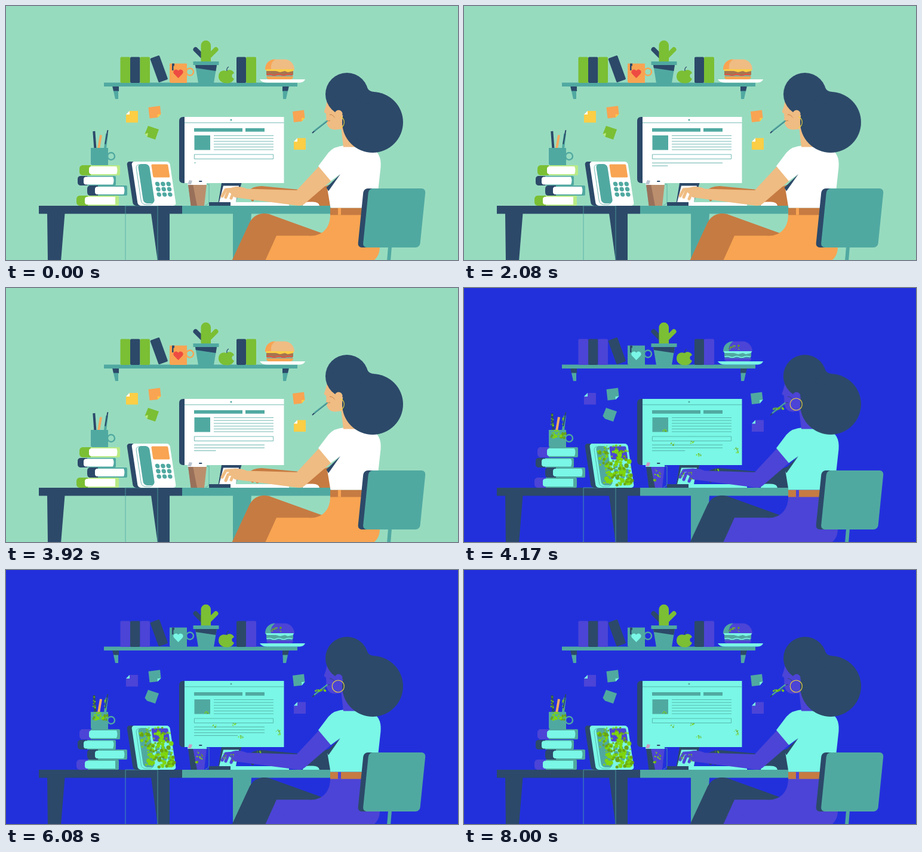
Recreate the animation shown at these times as an HTML page. Size 757 by 426 pixels, loop 8.08 s.

```html
<!DOCTYPE html>
<html lang="en">
<head>
<meta charset="utf-8">
<title>Desk by day and by blacklight</title>
<style>
html, body { margin: 0; width: 100%; height: 100%; overflow: hidden; }
svg { display: block; width: 100vw; height: 100vh; background: var(--bg); animation: theme 8.08s step-end infinite; }

@keyframes theme {
  0% {
    --bg: #97dbbf; --white: #fff; --cover: #7bbf34; --edge: #b9ea86; --mug: #f8a452;
    --heart: #ee4b42; --yellow: #fbce45; --leaf: #7bbf34; --skin: #efbc83; --shade: #c67b42;
    --skirt: #f8a452; --cup: #bb8f6d; --cupdark: #99705a; --patty: #a67450; --fold: #fbce45; --chip: #b9c3cf;
    --ring: #efbc83;
  }
  49.505%, 100% {
    --bg: #2230dc; --white: #7af7e6; --cover: #4c44d6; --edge: #50a9a0; --mug: #50a9a0;
    --heart: #7af7e6; --yellow: #4c44d6; --leaf: #50a9a0; --skin: #4c44d6; --shade: #2c4868;
    --skirt: #4c44d6; --cup: #4c44d6; --cupdark: #2c4868; --patty: #50a9a0; --fold: #7af7e6; --chip: #c99bc4;
    --ring: #f0d63c;
  }
}
.navy { fill: #2c4969; } .teal { fill: #50a9a1; } .green { fill: #7bbf34; }
.white { fill: var(--white); } .cover { fill: var(--cover); } .edge { fill: var(--edge); }
.mug { fill: var(--mug); } .yellow { fill: var(--yellow); } .leaf { fill: var(--leaf); }
.fold { fill: var(--fold); } .skin { fill: var(--skin); } .shade { fill: var(--shade); }
.skirt { fill: var(--skirt); } .belt { fill: #c67b42; }
.line { fill: none; stroke: #50a9a1; stroke-width: .8; }
.stroke { fill: none; stroke-linecap: round; stroke-linejoin: round; }
.finger { stroke: var(--skin); stroke-width: 5; animation: tap .404s ease-in-out infinite; }
.far { stroke: var(--shade); stroke-width: 5; animation: tap .505s ease-in-out infinite; }
.late { animation-delay: -.15s; } .later { animation-delay: -.28s; }
@keyframes tap { 50% { transform: translateY(-2.5px); } }

.head { transform-origin: 565px 235px; animation: nod 2.02s ease-in-out infinite; }
@keyframes nod { 0%, 94%, 100% { transform: none; } 29%, 66% { transform: rotate(-1.5deg); } }
.pencil { transform-origin: 538px 193px; animation: chew 1.01s ease-in-out infinite; }
@keyframes chew { 0%, 10%, 78%, 100% { transform: none; } 32%, 48% { transform: translate(1px, 3px) rotate(-9deg); } }
.swish { stroke: var(--white); stroke-width: .8; animation: swish 1.01s linear infinite; }
@keyframes swish { 0%, 18%, 90%, 100% { opacity: 0; } 30%, 50% { opacity: .9; } }
.shin { animation: sway 2.02s ease-in-out infinite; }
@keyframes sway { 50% { transform: rotate(3.6deg); } }

.typed rect { transform-origin: 315px 0; animation: type1 8.08s linear infinite; }
.typed rect:nth-child(2) { animation-name: type2; }
.typed rect:nth-child(3) { animation-name: type3; }
.typed rect:nth-child(4) { animation-name: type4; }
@keyframes type1 { 0% { transform: scaleX(.025); } 19.4%, 98.9% { transform: none; } 98.95%, 100% { transform: scaleX(0); } }
@keyframes type2 { 0%, 21.5% { transform: scaleX(0); } 40.6%, 98.9% { transform: none; } 98.95%, 100% { transform: scaleX(0); } }
@keyframes type3 { 0%, 42.5% { transform: scaleX(0); } 62%, 98.9% { transform: none; } 98.95%, 100% { transform: scaleX(0); } }
@keyframes type4 { 0%, 63.5% { transform: scaleX(0); } 82.5%, 98.9% { transform: none; } 98.95%, 100% { transform: scaleX(0); } }

.germs { animation: reveal 8.08s step-end infinite; }
@keyframes reveal { 0% { opacity: 0; } 49.505%, 100% { opacity: 1; } }
.germs circle { transform-box: fill-box; transform-origin: center; animation: pulse 1.01s ease-in-out infinite; }
@keyframes pulse { 50% { transform: scale(.7); } }
</style>
</head>
<body>
<svg viewBox="0 0 757 426" preserveAspectRatio="none">
  <!-- shelf -->
  <path class="navy" d="M178 134h11v9h-9zM463 134h11l-2 9h-9z"/>
  <path class="teal" d="M180 142.500h8v13.500h-5zM463.500 142.500h8.500l-3 13.500h-5zM164 128.500h324v6.500h-324z"/>
  <rect class="cover" x="191.500" y="85.500" width="16.500" height="43.500" rx="2"/>
  <rect class="navy" x="208" y="85.500" width="16.500" height="43.500" rx="2"/>
  <rect class="cover" x="224.500" y="85.500" width="16.500" height="43.500" rx="2"/>
  <rect class="navy" x="248" y="84" width="16.500" height="43" rx="2" transform="rotate(-20 256.200 105.500)"/>
  <rect class="navy" x="386" y="85.500" width="16" height="43.500" rx="2"/>
  <rect class="cover" x="402" y="85.500" width="17" height="43.500" rx="2"/>

  <circle cx="308" cy="110.500" r="6" fill="none" stroke="var(--mug)" stroke-width="2.400"/>
  <path class="mug" d="M274 96.500h29v32.500h-26q-3 0-3-3z"/>
  <path class="navy" d="M278 96.500h4v4h-1.500v7.500h-2.500z"/>
  <path fill="var(--heart)" d="M288.500 121l-7-7.200c-4-5 3-10.500 7-5.300 4-5.200 11 .3 7 5.300z"/>

  <path class="stroke" stroke="#2c4969" stroke-width="8" d="M317.500 73l11 11"/>
  <path class="stroke" stroke="#7bbf34" stroke-width="8" d="M351.500 73l-11 11"/>
  <path class="green" d="M326.500 94V66a8.200 8.200 0 0 1 16.500 0v28z"/>
  <path class="teal" d="M313.500 93h43v6h-43zM317 99h36l-5 30h-26z"/>
  <path class="navy" d="M317 99h36l-1.600 10-33.600-5z"/>

  <path class="green" d="M369 109c6-4 12-.5 13 4-5 1-5 7 0 9-2 5-6 7.500-12 7.500-9 0-14-5-14-11 0-9 7-12 13-9.500z"/>
  <path class="line" style="stroke:#2c4969;stroke-width:1.200" d="M370 109q-1-5 3-7"/>

  <path class="white" d="M425 123h76q-2 5-9 5.500h-54q-10 0-13-5.500z"/>
  <path class="skin" d="M434 107c0-10 7-17.500 16-17.500h17c9 0 16 8 16 17.500z"/>
  <path class="mug" d="M434 107c0-10 6-17.500 17-17.500-6 4-8 9-7 17.500z"/>
  <rect x="436" y="108" width="45" height="8.500" rx="2" fill="var(--patty)"/>
  <path class="fold" d="M435 106h47l-1 3-9 2-5-2-8 2-7-2h-16z"/>
  <path class="stroke" stroke="var(--heart)" stroke-width="1.600" d="M437 115.500q4-2 8 0t8 0 8 0 8 0 10 0"/>
  <path class="line" stroke="#7bbf34" d="M437 117.500h43"/>
  <path class="skirt" d="M436 118h45q0 5-5 5h-35q-5 0-5-5z"/>

  <!-- sticky notes -->
  <path class="yellow" d="M207 176h14v19.500h-20v-13.500z"/><path class="white" d="M207 176v6h-6z"/>
  <path class="mug" d="M238.500 170l19.500-2.500 1.500 14-5.500 5.500-13.500 1.500z"/><path class="fold" d="M254 187l-.5-5 6-.5z"/>
  <path class="leaf" d="M238 201l18 6-6 17-13.500-4.500-4-5z"/><path class="edge" d="M232.500 214.500l5.500-1.500-1.500 6.500z"/>
  <path class="mug" d="M480 177l19-2.500 1.500 13-5 6-13.500 1.500z"/><path class="fold" d="M495.500 193.500l-.5-5.500 5.500-.5z"/>
  <path class="yellow" d="M488 221.500h14v19.500h-20v-13.500z"/><path class="white" d="M488 221.500v6h-6z"/>

  <!-- pen cup and books -->
  <path class="stroke" stroke="#2c4969" stroke-width="4" style="stroke-linecap:butt" d="M147.300 210l2.200 30"/>
  <path class="stroke" stroke="#f4ab62" stroke-width="4" style="stroke-linecap:butt" d="M159 216.500l-4 23"/>
  <path class="stroke" stroke="#50a9a1" stroke-width="4" style="stroke-linecap:butt" d="M169 214l-3 25"/>
  <path class="stroke" stroke="#2c4969" stroke-width="2" d="M170.300 209l-4 22"/>
  <circle class="line" cx="176" cy="252" r="6" style="stroke-width:2.400"/>
  <path class="teal" d="M142 238h29v29h-26q-3 0-3-3z"/>
  <g>
    <rect class="edge" x="126" y="267" width="65" height="17" rx="2"/>
    <path class="cover" d="M142 267v17h-14q-5-1-5-6v-5q0-5 5-6z"/>
    <path class="white" d="M142 269h43q3 6 0 13h-43q-3-1-3-4v-5q0-3 3-4z"/>
    <rect class="teal" x="124" y="285" width="60" height="16" rx="2"/>
    <path class="navy" d="M136 285v16h-12q-4-1-4-5v-6q0-4 4-5z"/>
    <path class="white" d="M133 286.500h46q3 6 0 13h-46q-3-1-3-4v-5q0-3 3-4z"/>
    <rect class="teal" x="140" y="301" width="63" height="17" rx="2"/>
    <path class="navy" d="M154 301v17h-14q-4-1-4-6v-5q0-5 4-6z"/>
    <path class="white" d="M152 303h45q3 6 0 13h-45q-3-1-3-4v-5q0-3 3-4z"/>
    <rect class="edge" x="122" y="318" width="67" height="17" rx="2"/>
    <path class="cover" d="M137 318v17h-14q-5-1-5-6v-5q0-5 5-6z"/>
    <path class="white" d="M135 320h48v13h-48q-3-1-3-4v-5q0-3 3-4z"/>
  </g>

  <!-- desk -->
  <path class="navy" d="M55 335h240v13.500h-240zM69 348h29.500l-6.500 80h-22zM243 348h31v80h-20z"/>
  <path class="teal" d="M295 335h250v13.500h-250zM380 348h31l-5 80h-26z"/>
  <path class="line" d="M200 430v-95h54v95"/>

  <!-- phone -->
  <g transform="translate(202 261) skewX(8.500)">
    <rect class="navy" width="30" height="74" rx="5"/>
    <rect class="white" x="8" width="64" height="74" rx="5"/>
    <rect class="line" x="14.500" y="5" width="20" height="67" rx="6"/>
    <rect class="teal" x="18" y="4" width="19" height="66" rx="6"/>
    <rect class="skirt" x="40.500" y="4.500" width="28" height="22" rx="2"/>
    <g id="keys" class="teal"></g>
  </g>

  <!-- monitor -->
  <path class="navy" d="M300 186v111h-3q-7 0-7-7v-97q0-7 7-7z"/>
  <path class="white" d="M299 186h166.500v111h-166.500z"/>
  <path class="line" d="M299 195.800h166.500M348 217.500h100M348 222.200h100M348 227h100M348 231.700h100M348 236.400h100M348 241h100M315.400 249h132.200v7.500h-132.200z"/>
  <circle class="teal" cx="377" cy="191" r="1.500"/>
  <path class="teal" d="M315 205h81v5.800h-81zM401 205h32v5.800h-32zM315.500 217h26.500v24.500h-26.500z"/>
  <g class="typed teal">
    <rect x="315" y="262.700" width="118" height=".9"/>
    <rect x="315" y="267.600" width="118" height=".9"/>
    <rect x="315" y="272.400" width="118" height=".9"/>
    <rect x="315" y="277.200" width="118" height=".9"/>
  </g>
  <path class="navy" d="M361 297h33.500l-10 33h-29zM340 329h36v6h-36z"/>
  <path class="white" d="M364 301.500h26l-5 27.500h-28zM376 329h98v6h-98z"/>

  <!-- coffee -->
  <path class="line" d="M336 299h4v28q0 6-6 7"/>
  <path fill="var(--cup)" d="M305 299h31l-4 36h-22z"/>
  <path fill="var(--cupdark)" d="M305 299h8l7 36h-10.500z"/>
  <path class="white" d="M304 296h32v4h-32z"/>
  <path fill="var(--chip)" d="M304 299l3-7 5 1-2 6z"/>
  <rect class="navy" x="323" y="293" width="5.500" height="2" rx="1"/>

  <!-- far arm -->
  <g class="stroke">
    <path class="far" d="M420 309l-8 7 1 9"/>
    <path class="far late" d="M426 311l-5 6v8"/>
  </g>
  <path class="shade" d="M404 312q8-10 24-10l84 8 29-10 2 35h-43l-72-14q-14-1-24-9z"/>
  <path class="white" d="M497 335q0-6.500 9-6.500h8q10 0 11 6.500z"/>

  <!-- legs -->
  <g class="shin" style="transform-origin:432px 368px">
    <path class="shade" d="M370 445l38-82q8-15 26-15l24 40-28 57z"/>
  </g>
  <path class="shade" d="M408 364q8-16 26-16 6 0 12 3l86 31-10 12-70-6z"/>
  <g class="shin" style="transform-origin:455px 387px;animation-duration:2.020s">
    <path class="skirt" d="M453 385.500l-25 55h80v-55z"/>
  </g>
  <path class="skirt" d="M543 350c0 22-13 35.500-33 35.500h-57l-5 12 40 32h124q14-8 14-26l-30-4v-50z"/>
  <path class="belt" d="M543 338.500h56v12h-56z"/>
  <path class="skirt" d="M556 338.500h5v12h-5z"/>

  <!-- near arm and shirt -->
  <path class="skin" d="M525 268l-38 41-84-2.500q-7-4-18-3.500-12 1-12 8l10 10 107 14q7 0 12-5l44-38z"/>
  <g id="hand">
    <g class="stroke">
      <path class="finger" d="M384 307l-16 1-6 11"/>
      <path class="finger late" d="M386 311l-14 2-4 10"/>
      <path class="finger later" d="M388 314l-8 3-3 7"/>
    </g>
  </g>
  <path class="white" d="M568 234q-19 1-28 12l-17 22.500 21 25 15-11-21 23 5.500 33h76.500l7.500-68q2-26-18-33z"/>
  <path class="navy" d="M560 282l-23.500 22.500 3.500 6z"/>

  <!-- head -->
  <g class="head">
    <path class="skin" d="M538 155q-1 12-5 21-1 3 3 4l.5 8q-1 6 1 10 3 9 13 9.500l11-1 3.500 30h20v-80z"/>
    <circle class="navy" cx="571" cy="148" r="36"/>
    <circle class="navy" cx="614" cy="195" r="51"/>
    <path class="navy" d="M605 137q3 7 12 7l-10 20-20-5z"/>
    <circle class="skin" cx="557" cy="181" r="6.500"/>
    <path class="line" style="stroke:var(--shade);stroke-width:.9" d="M542 182q6 0 9 6M538 193l5-1"/>
    <path class="line" style="stroke:var(--ring);stroke-width:1.100" d="M560 185.700a10 10 0 1 0 0 18.600"/>
    <path class="line" style="stroke:#f0d63c;stroke-width:1.100" d="M560 185.700a10 10 0 0 1 0 18.600"/>
    <path class="swish stroke" d="M521 202l1 6M523 201l3 1M532 209l-4 6M522 211l5 2"/>
    <g class="pencil" id="pencil">
      <path class="stroke" stroke="#2c4969" stroke-width="2" d="M513.500 212.500l4-3.500"/>
      <path class="stroke" stroke="#50a9a1" stroke-width="2.800" d="M517 209l20.500-16"/>
      <path class="stroke" stroke="#2c4969" stroke-width=".6" d="M514 212.500l23-18"/>
    </g>
  </g>

  <!-- chair -->
  <path class="teal" d="M640 404h6l-2 24h-6z"/>
  <g transform="translate(599 306) skewX(-5.800)">
    <rect class="navy" width="40" height="99" rx="7"/>
    <rect class="teal" x="8.500" width="95.500" height="99" rx="7"/>
  </g>
  <g id="room"></g>
</svg>
<script>
const NS = 'http://www.w3.org/2000/svg';
let seed = 7;
const rand = () => (seed = seed * 16807 % 2147483647) / 2147483647;

function add(parent, name, attrs) {
  const el = document.createElementNS(NS, name);
  for (const key in attrs) el.setAttribute(key, attrs[key]);
  return parent.appendChild(el);
}

const keys = document.getElementById('keys');
for (let i = 0; i < 9; i++)
  add(keys, 'circle', { cx: 46 + i % 3 * 9.3, cy: 37.5 + Math.floor(i / 3) * 8.8, r: 3.7 });

// Scatters pulsing spots in a box around x, y; lean shifts them sideways with height.
function germs(id, x, y, w, h, count, size, lean = 0) {
  const group = add(document.getElementById(id), 'g', { class: 'germs' });
  for (let i = 0; i < count; i++) {
    const dy = (rand() - .5) * h;
    const spot = add(group, 'circle', {
      cx: x + (rand() - .5) * w + dy * lean,
      cy: y + dy,
      r: size * (.35 + .65 * rand()),
      fill: rand() < .65 ? '#7fd60e' : '#6aa412'
    });
    spot.style.animationDelay = -rand() * 1.01 + 's';
  }
}

germs('room', 255, 302, 48, 58, 125, 4, .15);
germs('room', 236, 288, 22, 34, 24, 3, .15);
germs('room', 253, 268, 36, 8, 14, 2.2);
germs('room', 158, 245, 25, 13, 32, 2.6);
germs('room', 148, 222, 4, 22, 9, 1.6);
germs('room', 167, 226, 4, 18, 7, 1.5);
germs('room', 336, 238, 7, 5, 5, 1.4);
germs('room', 350, 262, 8, 4, 5, 1.4);
germs('room', 383, 259, 9, 4, 5, 1.4);
germs('room', 393, 281, 9, 6, 8, 1.8);
germs('room', 455, 272, 8, 12, 8, 1.7);
germs('room', 324, 312, 12, 24, 16, 1.7);
germs('room', 452, 100, 17, 6, 15, 2.1);
germs('room', 422, 305, 11, 3, 6, 1.3);
germs('hand', 374, 314, 22, 13, 17, 1.6);
germs('pencil', 526, 202, 18, 3, 14, 1.9);
</script>
</body>
</html>
```
